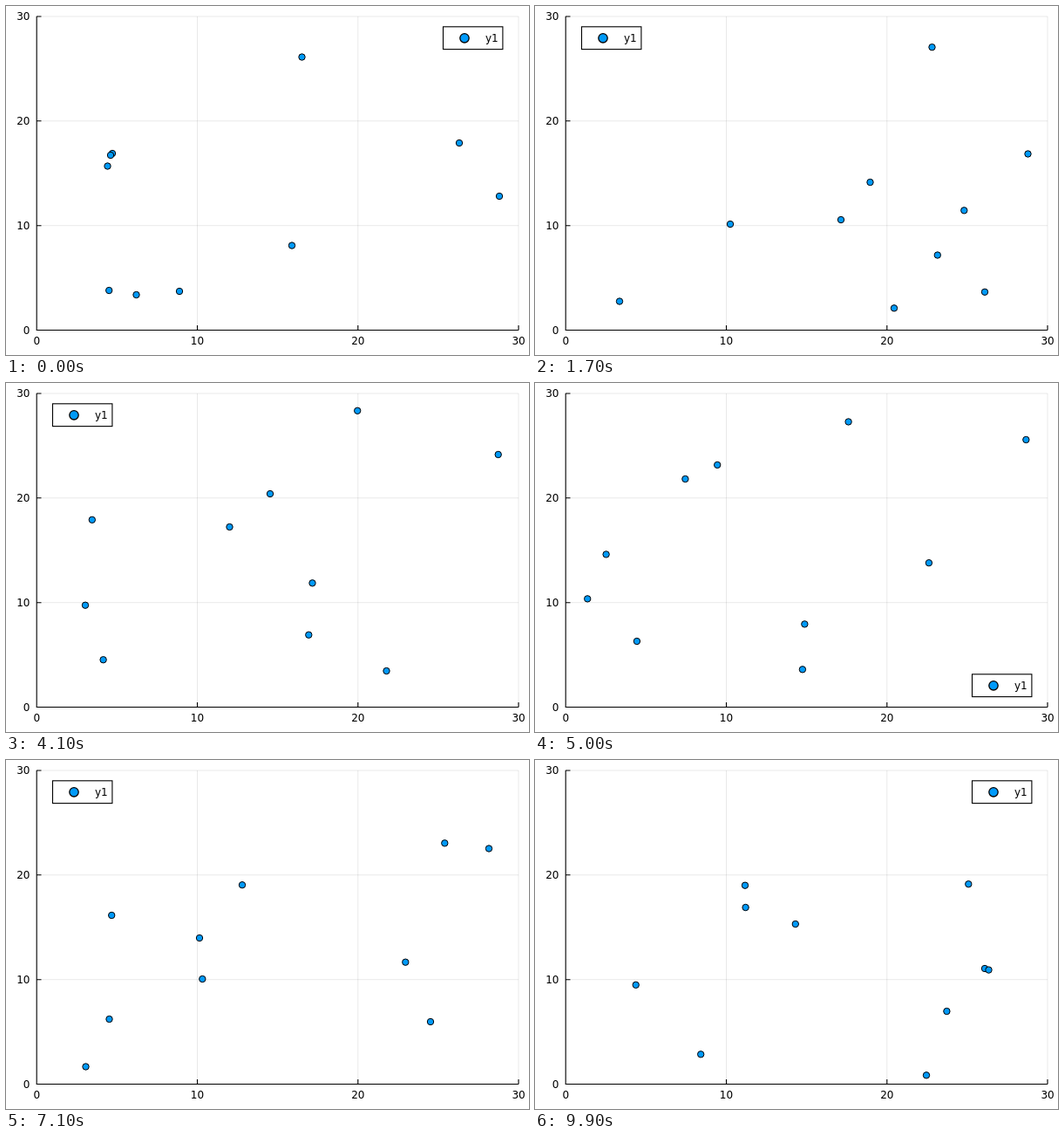
These frames come from a looping animation (600 px wide and 400 px high, 10 s). An HTML page:

```html
<!DOCTYPE html>
<html>
<head>
<meta charset="utf-8">
<style>
html, body { margin: 0; width: 100%; height: 100%; overflow: hidden; background: #fff; }
svg { display: block; }
text { font: 12px "DejaVu Sans", sans-serif; }
.line { fill: none; stroke: #000; stroke-width: 1.1; }
.grid { fill: none; stroke: #000; stroke-opacity: .09; stroke-width: 1; }
circle { fill: #009afa; stroke: #000; }
</style>
</head>
<body>
<svg width="600" height="400" viewBox="0 0 600 400">
  <path class="grid" d="M219.5 12V371.5M403.8 12V371.5M588 12V371.5M35 12H588M35 131.8H588M35 251.7H588"/>
  <path class="line" d="M35.2 12V371.5H588M35 12h5.5M35 131.8h5.5M35 251.7h5.5M219.5 371.5v-5.5M403.8 371.5v-5.5M588 371.5v-5.5"/>
  <g id="labels"></g>
  <g id="dots"></g>
  <g id="legend">
    <rect class="line" style="fill:#fff" x="501.5" y="23.8" width="68.4" height="25.8"/>
    <circle cx="526" cy="36.8" r="5.2" stroke-width="1.3"/>
    <text x="550" y="41">y1</text>
  </g>
</svg>
<script>
const STEP = 100, STEPS = 100;
const keys = [0, 17, 41, 59, 71, 84, 99];

// x, y at each key; values beyond a wall are mirrored back inside.
const tracks = [
  [566,218, 565.5,169.5, 564.7,82, 562,48, 554,101.5, 539.5,163.2, 630,239],
  [339.5,58.5, 455.5,47.2, 403.2,31.8, 316,-30.7, 503.3,-50.3, 421.8,-128.3, 241,-98.7],
  [520,157, 492.3,234.3, 351.5,229.3, 552.3,183, 487,300, 463.3,242.6, 520.5,240.6],
  [328,274.5, 516,327.8, 709.5,330, 968.7,326.6, 920.7,251, 770.5,290, 697,361.3],
  [199,327, 461.8,285.5, 347.3,288.7, 271.4,264, 458.3,231.7, 473.8,200.6, 497.3,142.2],
  [149.5,331, 412,376.7, 111.6,405.8, 122.2,448.2, 91.5,371.5, 190.8,280.7, 298.8,188],
  [118.2,326, 97,338.5, 91,254.7, 29.4,240, -22.5,297, -25.8,308.8, -19.7,257.8],
  [122,169, 384.5,202, 303,127, 115.4,60.8, 271,143.2, 426.3,225, 241.6,169],
  [120,171, 351,245, 256.5,165, 88.3,55, 121.2,178, 308.3,268.8, 190.2,337.3],
  [116.5,183.5, 224,250, 98.8,156.8, 64.4,236, 222,204, 426.6,266.2, 472.4,288]
];

// Step at which the legend jumps, with its offset from the top right corner.
const legendMoves = [[0, 0, 0], [5, -448, 0], [50, 0, 310], [65, -448, 0], [76, 0, 0]];

const $ = id => document.getElementById(id);

function add(parent, name, attrs, text = "") {
  const el = document.createElementNS("http://www.w3.org/2000/svg", name);
  for (const key in attrs) el.setAttribute(key, attrs[key]);
  el.textContent = text;
  return parent.appendChild(el);
}

for (let i = 0; i < 4; i++) {
  add($("labels"), "text", { x: 35.2 + i * 184.3, y: 387.5, "text-anchor": "middle" }, i * 10);
  add($("labels"), "text", { x: 27.5, y: 376 - i * 119.85, "text-anchor": "end" }, i * 10);
}
const dots = tracks.map(() => add($("dots"), "circle", { r: 3.7, "stroke-width": 1 }));

const fold = (v, lo, hi) => v < lo ? 2 * lo - v : v > hi ? 2 * hi - v : v;

function draw(now) {
  const step = Math.floor(now / STEP) % STEPS;
  let k = 0;
  while (k < keys.length - 2 && step >= keys[k + 1]) k++;
  const part = (step - keys[k]) / (keys[k + 1] - keys[k]);

  tracks.forEach((track, i) => {
    const at = j => track[2 * k + j] + (track[2 * k + 2 + j] - track[2 * k + j]) * part;
    dots[i].setAttribute("cx", fold(at(0), 48, 573));
    dots[i].setAttribute("cy", fold(at(1), 22.5, 361.5));
  });

  const [, dx, dy] = legendMoves.filter(move => move[0] <= step).pop();
  $("legend").setAttribute("transform", `translate(${dx} ${dy})`);
}

const start = performance.now();
function tick() {
  draw(performance.now() - start);
  requestAnimationFrame(tick);
}
tick();
</script>
</body>
</html>
```
